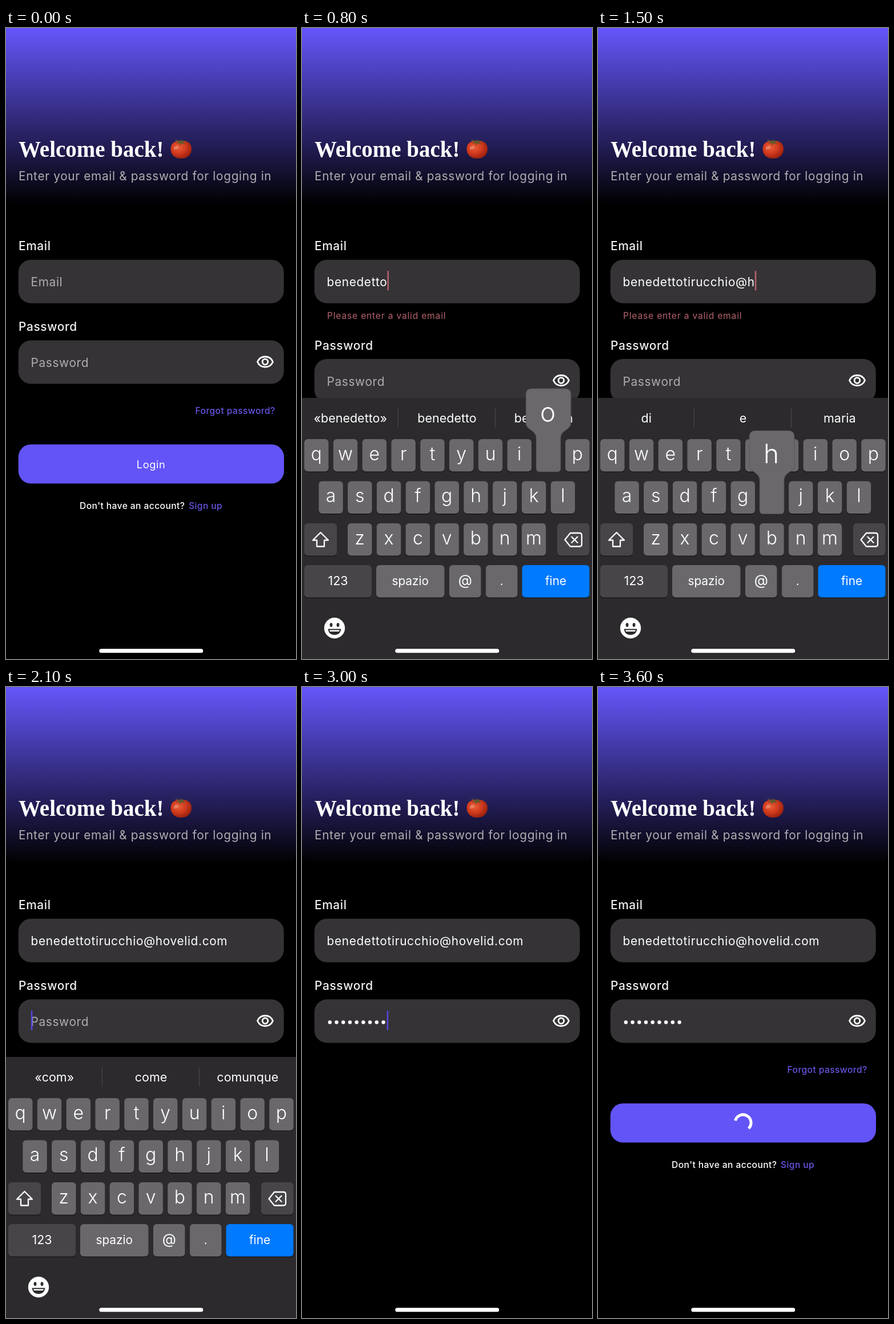
An HTML page for the animation above (3700 ms loop, 508 px wide and 1102 px high).

```html
<!DOCTYPE html>
<html lang="en">
<head>
<meta charset="utf-8">
<title>Login form</title>
<style>
html, body { margin: 0; width: 100%; height: 100%; overflow: hidden; background: #000; }
svg { display: block; width: 100%; height: 100%; }
text { font: 400 20.84px Inter, sans-serif; font-optical-sizing: none; fill: #fff; white-space: pre; }
.body { letter-spacing: .65px; }
.label { font-weight: 500; fill: #f0eff2; }
.hint { fill: #b0adb1; }
.title { font: 700 39px "Liberation Serif", serif; }
.small { font-size: 15.63px; font-weight: 500; letter-spacing: .4px; }
.link { fill: #6655e3; }
.error { font-size: 15.63px; letter-spacing: .8px; fill: #b3606d; }
.login { font-size: 18.2px; letter-spacing: .6px; }
.mid { text-anchor: middle; }
.key { font-size: 32px; font-weight: 300; }
.big { font-size: 46px; font-weight: 300; }
.word { font-size: 21.5px; }
.field { fill: #353336; }
.line { fill: none; stroke: #fff; stroke-linejoin: round; stroke-linecap: round; }
</style>
</head>
<body>
<svg viewBox="0 0 508 1102" preserveAspectRatio="none">
  <defs>
    <linearGradient id="sky" x2="0" y2="1">
      <stop stop-color="#6556fb"/><stop offset="1" stop-color="#000"/>
    </linearGradient>
    <radialGradient id="skin" cx=".38" cy=".38" r=".7">
      <stop stop-color="#ea5f38"/><stop offset=".5" stop-color="#d03a1d"/><stop offset="1" stop-color="#8f1d0d"/>
    </radialGradient>
    <linearGradient id="fade">
      <stop stop-color="#2c2a2d"/><stop offset="1" stop-color="#2c2a2d" stop-opacity="0"/>
    </linearGradient>
  </defs>
  <rect width="508" height="1102"/>
  <path d="M0 0H508V288q0 22-22 22H22q-22 0-22-22z" fill="url(#sky)"/>
  <text class="title" x="22" y="225">Welcome back!</text>
  <g id="tomato">
    <path d="M288.5 211c0-10 8-14.500 18.300-14.500s18.300 4.500 18.300 14.500c0 11-8 17-18.300 17s-18.300-6-18.300-17z" fill="url(#skin)"/>
    <ellipse cx="298" cy="209" rx="4.5" ry="3" fill="#fff" opacity=".25" transform="rotate(-25 298 209)"/>
    <path d="M306 198l-11-4 7 5-5 3 7-1 1 5 2-5 7 2-4-4 6-2-8 0-1-3z" fill="#5a5a2c"/>
  </g>
  <text class="body hint" x="22" y="266">Enter your email &amp; password for logging in</text>

  <text class="body label" x="22" y="388">Email</text>
  <rect class="field" x="21.7" y="404.7" width="465" height="76" rx="22"/>
  <text id="mailHint" class="body hint" x="43.5" y="451">Email</text>
  <text id="mail" class="body" x="43.5" y="450.5"></text>
  <text id="error" class="error" x="44" y="508">Please enter a valid email</text>

  <g id="pass">
    <text class="body label" x="22" y="529">Password</text>
    <rect class="field" x="21.7" y="545.5" width="465" height="76" rx="22"/>
    <text id="passHint" class="body hint" x="43.5" y="592">Password</text>
    <g id="dots" fill="#fff"></g>
    <g class="line" stroke-width="2.8">
      <path d="M440.5 583c5-12 22-12 27 0c-5 12-22 12-27 0z"/>
      <circle cx="454" cy="583" r="4.8"/>
    </g>
  </g>
  <rect id="caret" width="2.6" height="34.5" rx="1"/>

  <text class="small link" x="331.5" y="674">Forgot password?</text>
  <rect x="21.7" y="727.2" width="465.3" height="68.4" rx="22" fill="#6354f8"/>
  <text id="login" class="login mid" x="254" y="769">Login</text>
  <path id="spin" d="M240.5 757.400A14 14 0 1 1 263.900 770.900" fill="none" stroke="#fff" stroke-width="5"/>
  <text class="small" x="129" y="840">Don't have an account?</text>
  <text class="small link" x="320" y="840">Sign up</text>

  <rect id="cover" y="646" width="508" height="456"/>
  <g id="board">
    <rect y="646" width="508" height="456" fill="#2c2a2d"/>
    <path d="M168.5 664v34M338.5 664v34" stroke="#464448" stroke-width="1.3"/>
    <g id="words"></g>
    <g id="keys"></g>
    <g class="line" stroke-width="2.3">
      <path d="M32.5 881L46 894.5H39V905.5H26V894.5H19z"/>
      <path d="M470 882H486q4 0 4 4V901.5q0 4-4 4H470L460.5 893.7zM472.5 888.7l10 10m0-10l-10 10"/>
    </g>
    <circle cx="57" cy="1048" r="18.2" fill="#fff"/>
    <g fill="#2c2a2d">
      <ellipse cx="51" cy="1042.5" rx="2.4" ry="3.4"/>
      <ellipse cx="63" cy="1042.5" rx="2.4" ry="3.4"/>
      <path d="M45.5 1049.5h23c-1 7-5 10.5-11.5 10.5s-10.5-3.5-11.5-10.5z"/>
    </g>
    <path d="M48 1051.5h18l-1 2.5h-16z" fill="#fff"/>
    <g id="popup"></g>
  </g>
  <rect x="163.3" y="1084.2" width="182" height="7" rx="3.5" fill="#fff"/>
</svg>
<script>
const $ = id => document.getElementById(id);
const show = (id, on) => $(id).setAttribute('visibility', on ? 'visible' : 'hidden');
const move = (id, y) => $(id).setAttribute('transform', `translate(0 ${y})`);

const LOOP = 3700, STEP = 100;
const MAIL = 'benedettotirucchio@hovelid.com';
// characters typed and key held down, one entry per step
const TYPED = [0, 0, 1, 2, 3, 5, 6, 8, 9, 11, 12, 14, 15, 17, 19, 20, 22, 25, 27, 30];
const HELD = '  be detoirchi hvi  ';
const DOTS = [1, 2, 3, 5, 6, 8, 9];
const ROWS = [['qwertyuiop', 4, 718], ['asdfghjkl', 29.3, 791.5], ['zxcvbnm', 80, 865]];
const PITCH = 50.8, KEY_W = 42.5;

function cap(x, y, w, fill) {
  const box = (dy, c) => `<rect x="${x}" y="${y + dy}" width="${w}" height="56.5" rx="6" fill="${c}"/>`;
  return box(1.4, '#19181a') + box(0, fill);
}

const GREY = '#6a686b', DARK = '#474548';
const places = {};
let keys = '';
for (const [letters, x0, y] of ROWS) {
  [...letters].forEach((c, i) => {
    const x = x0 + i * PITCH;
    places[c] = [x, y];
    keys += cap(x, y, KEY_W, GREY) +
      `<text class="key mid" x="${x + KEY_W / 2}" y="${y + 36.5}">${c}</text>`;
  });
}
keys += cap(4, 865, 57, DARK) + cap(447, 865, 56.5, DARK);
for (const [label, x, w, fill, size] of [
  ['123', 4, 118, DARK, 21.5], ['spazio', 130, 119.5, GREY, 20.8], ['@', 258, 55.5, GREY, 25],
  ['.', 322, 55.5, GREY, 21], ['fine', 385.5, 118, '#007aff', 20.8]
]) {
  keys += cap(x, 938, w, fill) +
    `<text class="mid" x="${x + w / 2}" y="973" style="font-size:${size}px">${label}</text>`;
}
$('keys').innerHTML = keys;

function popup(c) {
  if (!places[c]) return '';
  const [x, y] = places[c], left = x - 18, top = y - 88;
  return `<path d="M${left} ${top + 10}q0-10 10-10h58.5q10 0 10 10v50c0 12-18 12-18 26v53q0 6-6 6
    h-30.5q-6 0-6-6v-53c0-14-18-14-18-26z" fill="${GREY}" stroke="#5b595c"/>
    <text class="big mid" x="${x + KEY_W / 2 - 1}" y="${y - 31.5}">${c}</text>`;
}

function suggestions(n) {
  const quote = s => `«${s}»`, usual = ['di', 'e', 'maria'];
  if (n < 1) return usual;
  if (n < 4) return [quote(MAIL.slice(0, n)), 'benissimo', 'beneficio'];
  if (n < 11) return [quote(MAIL.slice(0, n)), 'benedetto', 'benedetta'];
  if (n < 19) return [quote(MAIL.slice(0, Math.max(11, n - 2))), MAIL.slice(0, 18),
    MAIL.slice(0, 9) + ' ' + MAIL.slice(9, 18)];
  if (n < 22) return usual;
  if (n < 27) return [quote(MAIL.slice(19, n)), 'hotel', 'ho'];
  return n < 30 ? usual : [quote('com'), 'come', 'comunque'];
}

// long words keep their end in view; fresh ones still fade in at the right
function drawWords(list, fresh) {
  $('words').innerHTML = list.map((s, i) => {
    const long = s.length > 12, x = i * 169.3;
    const tail = fresh && i ? 3 - i : 0, cut = s.length - tail;
    const end = [...s.slice(cut)].map((c, k) =>
      `<tspan fill-opacity="${k ? .25 : .6}">${c}</tspan>`).join('');
    return `<svg x="${x + 1}" y="650" width="167" height="60">
      <text class="word" x="${long ? 155 : 83.7}" y="39" text-anchor="${long ? 'end' : 'middle'}">${s.slice(0, cut)}${end}</text>
      ${long ? '<rect width="16" height="60" fill="url(#fade)"/>' : ''}</svg>`;
  }).join('');
}

function draw(f) {
  const n = TYPED[Math.min(f, TYPED.length - 1)];
  const dots = f < 24 ? 0 : DOTS[Math.min(f - 24, DOTS.length - 1)];
  const bad = n > 0 && n < 29, onPass = f >= 20;

  $('mail').textContent = MAIL.slice(0, n);
  show('mailHint', !n);
  show('error', bad);
  move('pass', bad ? 32.5 : 0);
  show('passHint', !dots);
  $('dots').innerHTML = Array.from({ length: dots }, (_, i) =>
    `<circle cx="${48.8 + i * 11.72}" cy="585.5" r="3.2"/>`).join('');

  const caret = $('caret');
  const x = onPass ? 43.8 + dots * 11.65 : 43.5 + (n ? $('mail').getComputedTextLength() : 0);
  caret.setAttribute('x', x);
  caret.setAttribute('y', onPass ? 565 : 424);
  caret.setAttribute('fill', bad ? '#b3606d' : '#5446dc');
  show('caret', f >= 1 && f < 32);

  show('board', f >= 1 && f < 22);
  move('board', f === 1 ? 190 : 0);
  show('cover', f >= 22 && f < 33);
  move('cover', f === 32 ? 190 : 0);
  drawWords(suggestions(n), f === 4);
  $('popup').innerHTML = popup(HELD[f]);

  show('login', f < 35);
  show('spin', f >= 35);
  $('spin').setAttribute('transform', `rotate(${(f - 36) * 70} 254 761)`);
}

const start = performance.now();
let last = -1;
function tick() {
  const f = Math.floor((performance.now() - start) % LOOP / STEP);
  if (f !== last) draw(last = f);
  requestAnimationFrame(tick);
}
tick();
</script>
</body>
</html>
```
